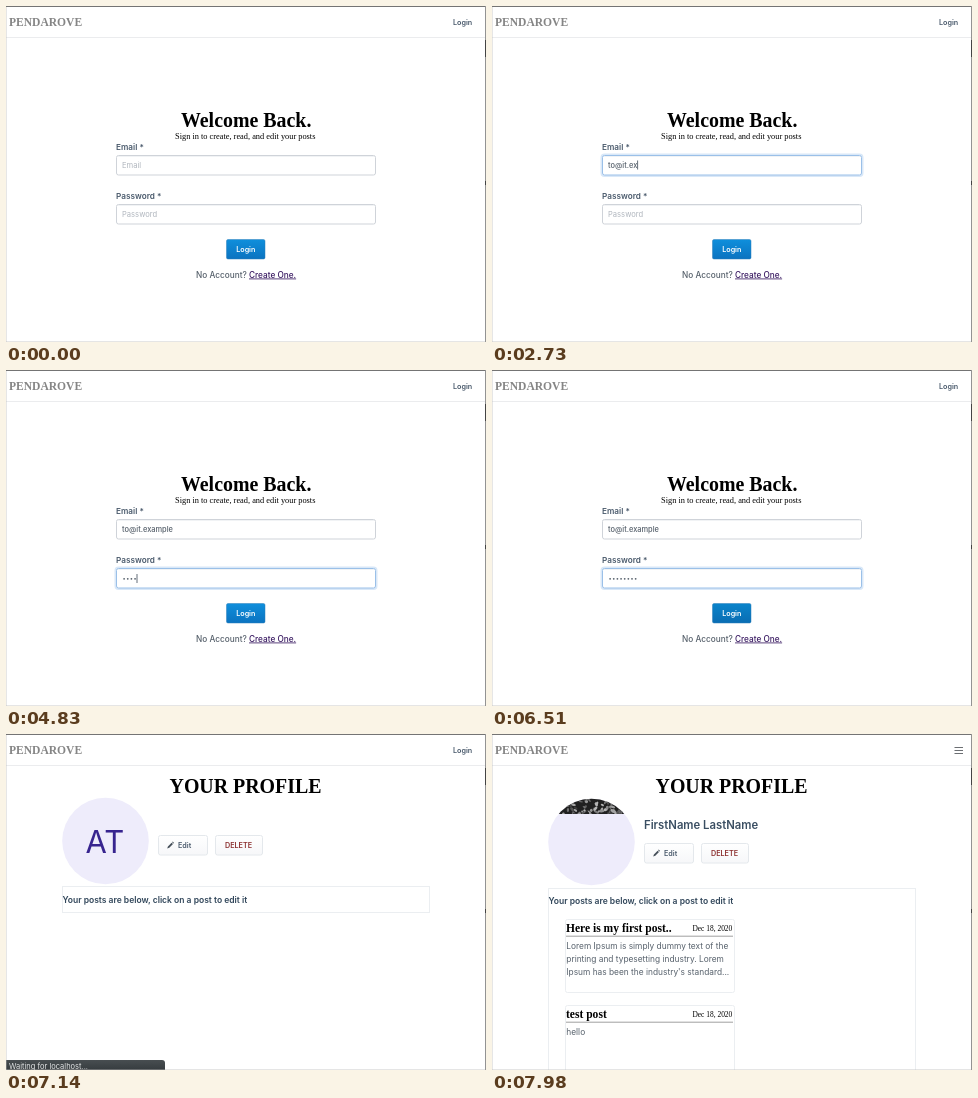
Recreate the animation shown at these times as an HTML page. Size 480x336 px, loop 8000 ms.

```html
<!DOCTYPE html>
<html lang="en">
<head>
<meta charset="utf-8">
<title>Pendarove</title>
<style>
  html, body { margin: 0; width: 100%; height: 100%; overflow: hidden; background: #fff; }
  svg { display: block; width: 480px; height: 336px; }
  text { font: 8.35px Inter, "Open Sans", sans-serif; fill: #56606b; }
  .serif, .bold { font-family: "Liberation Serif", "Noto Serif", serif; fill: #000; }
  .bold { font-weight: 700; font-size: 11.55px; }
  .h1 { font-size: 19.9px; }
  .small { font-size: 7.45px; }
  .mid { font-weight: 500; }
  .semi { font-weight: 600; fill: #4a5a6c; }
  .label { font-size: 8.2px; }
  .tag { font-size: 7.2px; }
  .hint { font-size: 7.6px; fill: #b0b6be; }
  .field { fill: #fff; stroke: #cfd3d9; }
  .focus .field { stroke: #9bc0e8; }
  .glow { fill: none; }
  .focus .glow { stroke: #d9e8f8; stroke-width: 2; }
  .inner { stroke: #f1f3f5; }
  .button { fill: url(#pale); stroke: #e4e8ec; }
  .panel { fill: none; stroke: #ebeef1; }
  .rule { stroke: #888; stroke-width: .8; }
</style>
</head>
<body>
<svg viewBox="0 0 480 336">
  <defs>
    <linearGradient id="blue" x2="0" y2="1"><stop stop-color="#0f8fdc"/><stop offset="1" stop-color="#0b73c0"/></linearGradient>
    <linearGradient id="dark" x2="0" y2="1"><stop stop-color="#0a84cb"/><stop offset="1" stop-color="#0a6db3"/></linearGradient>
    <linearGradient id="pale" x2="0" y2="1"><stop stop-color="#fff"/><stop offset="1" stop-color="#f6f7f9"/></linearGradient>
    <linearGradient id="bar" x2="0" y2="1"><stop stop-color="#484e51"/><stop offset="1" stop-color="#363c3f"/></linearGradient>
    <clipPath id="round"><circle cx="99.5" cy="108" r="43.3"/></clipPath>
  </defs>

  <text class="bold" x="3" y="20" style="fill:#858585">PENDAROVE</text>
  <path d="M0 31.5H479" stroke="#ebecee"/>
  <text id="navLogin" class="semi tag" x="447" y="18.6">Login</text>
  <path id="menu" d="M462.5 13.5h8.5M462.5 16.5h8.5M462.5 19.5h8.5" stroke="#6c6f73" stroke-width="1.2"/>

  <g id="login">
    <text class="bold h1" x="240.2" y="120.6" text-anchor="middle">Welcome Back.</text>
    <text class="serif" x="169" y="132.8">Sign in to create, read, and edit your posts</text>
    <text class="semi label" x="110" y="144">Email *</text>
    <text class="semi label" x="110" y="193">Password *</text>
    <g id="email">
      <rect class="glow" x="109.5" y="148.5" width="261" height="21.5" rx="3"/>
      <rect class="field" x="110.5" y="149.5" width="259" height="19.5" rx="2"/>
      <path class="inner" d="M112 150.5h256"/>
      <text id="emailHint" class="hint" x="116" y="162">Email</text>
      <text id="emailText" class="mid small" x="116" y="162"></text>
    </g>
    <g id="pass">
      <rect class="glow" x="109.5" y="197.5" width="261" height="21.5" rx="3"/>
      <rect class="field" x="110.5" y="198.5" width="259" height="19.5" rx="2"/>
      <path class="inner" d="M112 199.5h256"/>
      <text id="passHint" class="hint" x="116" y="211">Password</text>
      <g id="dots" fill="#56606b"></g>
    </g>
    <rect id="caret" width=".8" height="9" fill="#3d4a58"/>
    <rect id="submit" x="220.5" y="233.5" width="38.5" height="19.5" rx="1.5" stroke="#2b7fba" stroke-width=".5"/>
    <text class="semi tag" x="239.8" y="246" text-anchor="middle" style="fill:#fff">Login</text>
    <text class="mid" x="190" y="271.5" style="font-size:8.25px">No Account? <tspan fill="#3b1c63" text-decoration="underline">Create One.</tspan></text>
  </g>

  <g id="profile">
    <text class="bold h1" x="239.5" y="58.8" text-anchor="middle">YOUR PROFILE</text>
    <g id="avatar">
      <circle cx="99.5" cy="107" r="43.3" fill="#eeecfb"/>
      <text id="initials" x="99" y="118.7" text-anchor="middle" style="font-size:31px;fill:#37248f">AT</text>
    </g>
    <g clip-path="url(#round)"><svg id="photo" width="480" height="80"></svg></g>
    <text id="name" class="semi" x="152" y="95.3" style="font-size:11.3px;fill:#3a4e62">FirstName LastName</text>
    <g id="actions">
      <rect class="button" x="152.5" y="101.5" width="49" height="19.5" rx="2"/>
      <path d="M161.2 114.5l.7-2.1 3.7-3.7 1.4 1.4-3.7 3.7zM166.1 108.2l.6-.6 1.4 1.4-.6.6z" fill="#46505a"/>
      <text class="semi tag" x="172" y="114">Edit</text>
      <rect class="button" x="209.5" y="101.5" width="47" height="19.5" rx="2"/>
      <text class="semi tag" x="219" y="114" style="fill:#8c3030">DELETE</text>
    </g>
    <rect id="panel" class="panel" x="56.5" width="367"/>
    <text id="intro" x="56.5" y="168.5" style="font-weight:600;font-size:8.53px;fill:#32475b">Your posts are below, click on a post to edit it</text>
    <g id="posts"></g>
    <g id="status">
      <path d="M0 326h156q3 0 3 3v7H0z" fill="url(#bar)"/>
      <text x="3" y="335" style="font-size:7.5px;fill:#e4e6e7">Waiting for localhost...</text>
    </g>
  </g>

  <path d="M.25 0V336M0 335.75H480" stroke="#bbb" stroke-width=".5"/>
  <path d="M0 .5H480" stroke="#747474"/>
  <path d="M479.5 0V336" stroke="#939393"/>
  <path d="M479.5 34v17M479.5 175v4" stroke="#444"/>
</svg>
<script>
const $ = id => document.getElementById(id);
const show = (id, on) => $(id).setAttribute('visibility', on ? 'inherit' : 'hidden');
const set = (id, attrs) => { for (const k in attrs) $(id).setAttribute(k, attrs[k]); };
const shift = (id, y) => set(id, { transform: `translate(0 ${y})` });
const passed = (times, t) => times.filter(at => at <= t).length;

const EMAIL = 'to@it.example';
const EMAIL_KEYS = [1890, 2030, 2100, 2100, 2240, 2590, 2660, 2730, 2800, 3360, 3500, 3710, 3850];
const PASS_KEYS = [4340, 4410, 4550, 4830, 5040, 5180, 5460, 5740];
const PITCH = 3.65;

function post(y, height, title, lines) {
  return `<rect class="panel" x="73.5" y="${y + .5}" width="169" height="${height}" rx="2"/>
    <text class="bold" x="74" y="${y + 13.3}">${title}</text>
    <text class="serif small" x="240.3" y="${y + 12}" text-anchor="end">Dec 18, 2020</text>
    <path class="rule" d="M74 ${y + 17.2}H241"/>` +
    lines.map((s, i) => `<text x="74.3" y="${y + 29.5 + 13 * i}">${s}</text>`).join('');
}
$('posts').innerHTML =
  post(185, 73, 'Here is my first post..', [
    'Lorem Ipsum is simply dummy text of the',
    'printing and typesetting industry. Lorem',
    "Ipsum has been the industry's standard..."]) +
  post(271, 80, 'test post', ['hello']);

$('dots').innerHTML = PASS_KEYS.map((_, i) =>
  `<circle cx="${118.1 + PITCH * i}" cy="208.8" r=".9"/>`).join('');

// Mottled grey foliage
let seed = 7;
const rnd = () => (seed = seed * 16807 % 2147483647) / 2147483647;
let leaves = '<path d="M56 64h88v90H56z" fill="#202020"/>';
for (let i = 0; i < 90; i++) {
  const v = 50 + rnd() * 140 | 0, x = 64 + rnd() * 72, y = 64 + rnd() * 18;
  leaves += `<ellipse cx="${x}" cy="${y}" rx="${1 + rnd() * 2}" ry="${.6 + rnd()}" fill="rgb(${v},${v},${v})" transform="rotate(${rnd() * 180} ${x} ${y})"/>`;
}
$('photo').innerHTML = leaves;

function drawLogin(t) {
  const typed = passed(EMAIL_KEYS, t), dots = passed(PASS_KEYS, t);
  const inPass = t >= 3990;
  $('email').classList.toggle('focus', t >= 1120 && !inPass);
  $('pass').classList.toggle('focus', inPass);
  $('emailText').textContent = EMAIL.slice(0, typed);
  show('emailHint', !typed);
  show('passHint', !dots);
  [...$('dots').children].forEach((dot, i) =>
    dot.setAttribute('visibility', i < dots ? 'inherit' : 'hidden'));
  const x = inPass ? 116 + PITCH * dots : 116 + (typed ? $('emailText').getComputedTextLength() : 0);
  set('caret', { x, y: inPass ? 204 : 154.5 });
  show('caret', t >= 1120 && t < 6230 && !(t >= 1680 && t < 1890));
  set('submit', { fill: t >= 6510 && t < 6790 ? 'url(#dark)' : 'url(#blue)' });
}

function drawProfile(t) {
  const loaded = t >= 7350, down = loaded ? 1 : 0;
  shift('avatar', down);
  shift('intro', down);
  shift('actions', 8 * down);
  set('panel', { y: 152.5 + down * 2, height: loaded ? 200 : 26 });
  show('initials', t < 7560);
  show('name', loaded);
  show('posts', loaded);
  show('status', t >= 7070 && !loaded);
  show('photo', t >= 7910);
  set('photo', { height: t >= 7980 ? 80 : 73 });
}

function draw(t) {
  const signedIn = t >= 6930;
  show('login', !signedIn);
  show('profile', signedIn);
  show('navLogin', t < 7350);
  show('menu', t >= 7350);
  drawLogin(t);
  drawProfile(t);
}

function frame() {
  draw(performance.now() % 8000);
  requestAnimationFrame(frame);
}
frame();
</script>
</body>
</html>
```
